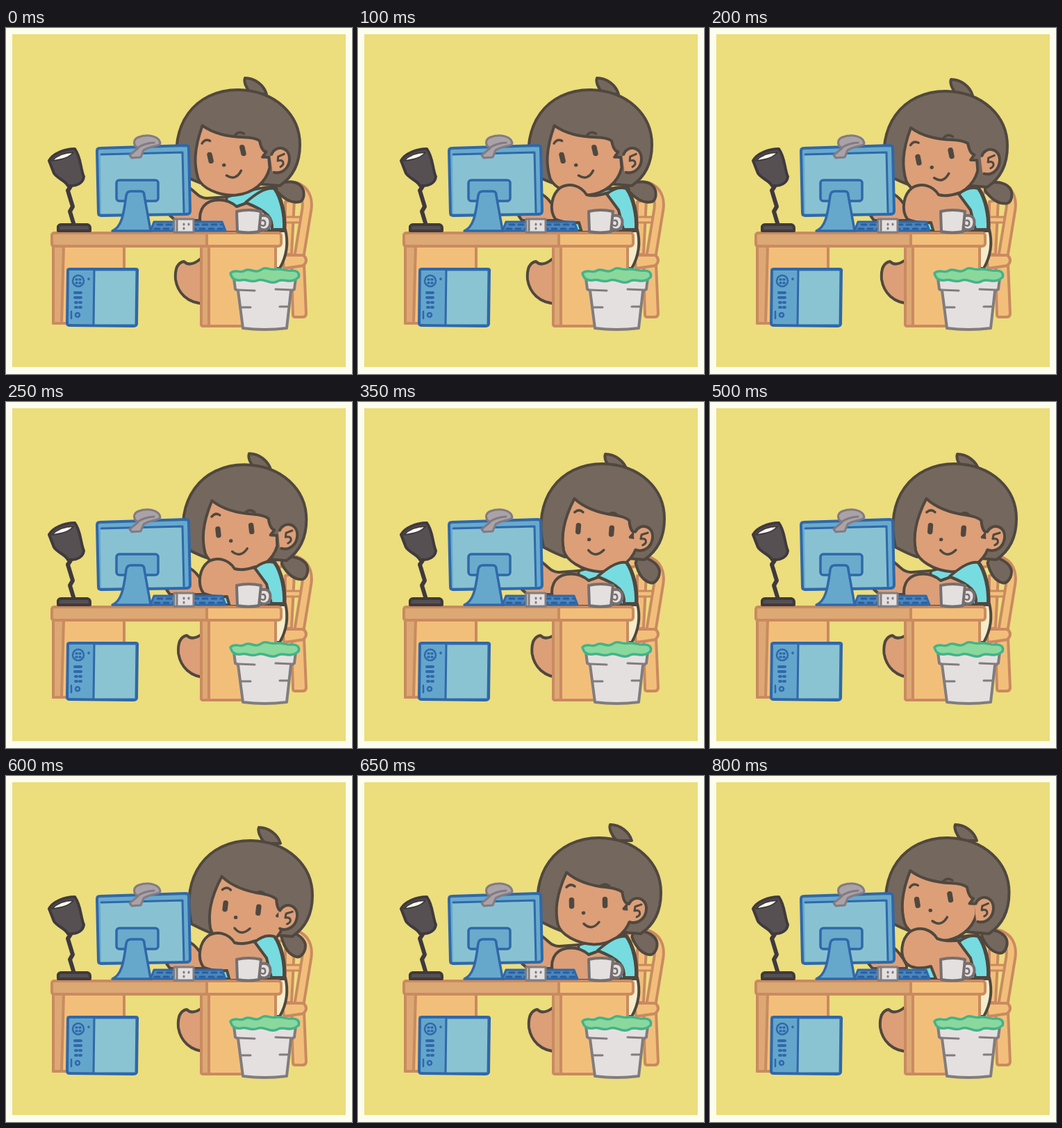
Write an HTML page that moves like this. It is 498x498 px and loops after 0.85 s.

```html
<!DOCTYPE html>
<html lang="en">
<head>
<meta charset="utf-8">
<title>Working at the desk</title>
<style>
html, body { margin: 0; width: 100%; height: 100%; overflow: hidden; background: #fdfdef; }
svg { display: block; width: 498px; height: 498px; stroke-width: 4; stroke-linecap: round; stroke-linejoin: round; }
.line { fill: none; }
.ink { stroke: #50483f; }
.skin { fill: #dc9f78; }
.hair { fill: #74675e; }
.shirt { fill: #76dce0; }
.wood { fill: #f2bf7a; stroke: #ca8a60; }
.shade { fill: #dca873; }
.blue { stroke: #2f68aa; }
.gray { stroke: #827c7e; fill: #e4e0e0; }
</style>
</head>
<body>
<svg viewBox="0 0 498 498">
  <rect x="9" y="9" width="480" height="479" fill="#ecdd7d"/>

  <g class="wood">
    <path class="line" stroke-width="17" d="M394 231C420 221 436 237 433 260L421 334"/>
    <path class="line" stroke-width="9" d="M394 231C420 221 436 237 433 260L421 334" style="stroke:#f2bf7a"/>
    <path d="M402 250L415 247L411 326H402Z"/>
    <path d="M402 272H424L423 280H402Z" stroke-width="3"/>
    <path d="M411 345L429 340L432 412Q431 416 427 416H416Q413 416 413 412Z"/>
    <path d="M398 327H428Q436 334 428 342L400 346Z"/>
  </g>

  <path class="ink" fill="#f5edc9" d="M386 290H402C407 310 403 330 394 346H386Z"/>
  <path class="ink shirt" d="M305 246C335 240 360 228 386 229C398 245 403 270 401 292H305Z"/>

  <path id="tail" class="ink hair" d="M-20 -13C-8 -14 8 -18 17 -8C23 0 21 12 15 14C3 17 -9 9 -18 -1Z"/>
  <path id="tuft" class="ink hair" d="M9 24C1 15 -2 6 0 1C14 1 27 11 31 24Z"/>
  <path id="hair" class="ink hair" d="M267 209C251 140 290 89 352 89C406 90 441 125 441 168C441 195 430 215 412 227L376 224L298 223C286 219 277 214 267 209Z"/>
  <path id="face" class="ink skin" d="M-31 -44C-15 -30 8 -24 27 -22C36 -21 44 -19 49 -15C50 -5 53 1 57 2L51 9L60 10V25C53 46 32 60 8 60C-18 59 -40 45 -44 31C-48 12 -47 -10 -31 -44Z"/>
  <g id="ear">
    <path class="skin" d="M-12 -5C-4 -21 16 -18 15 0C15 14 2 22 -11 18Z"/>
    <path class="ink line" d="M-10 -8C-4 -21 16 -18 15 0C14 14 2 22 -9 18"/>
    <path class="ink line" stroke-width="3" d="M8 -7L-1 -4L-2 2C7 0 8 8 1 11"/>
  </g>
  <g id="features" class="ink line">
    <path stroke-width="7.5" d="M-24 -4.5V4.5M24 -4.5V4.5"/>
    <path stroke-width="3.5" d="M-31 -23Q-25 -29 -19 -24M18 -24Q25 -29 31 -23"/>
    <path stroke-width="3.5" d="M-7 30Q4 41 15 28"/>
    <path stroke-width="5" d="M-7.5 14.5H-7"/>
  </g>

  <path id="backArm" class="ink skin"/>
  <path id="frontArm" class="ink skin"/>
  <path id="sleeve" class="ink shirt"/>
  <path id="leg" class="ink skin" d="M288 322C278 338 264 344 256 336C246 338 243 349 244 362C247 380 260 397 288 397Z"/>

  <g class="wood">
    <path d="M68 314H170V425H68Z"/>
    <path class="shade" d="M68 314H83L80 425H68Z"/>
    <path d="M281 314H388V429H284Q280 429 281 424Z"/>
    <path class="shade" d="M281 314H292V429H284Q280 429 281 424Z"/>
    <rect x="66" y="295" width="330" height="19" rx="4"/>
    <path class="shade" d="M289 295V314H70Q66 314 66 310V299Q66 295 70 295Z"/>
  </g>

  <g class="blue">
    <path fill="#64a6cb" d="M89 349Q89 347 92 347H187Q190 347 189 351L188 426Q187 429 183 429L91 428Q88 428 88 424Z"/>
    <path fill="#8ac4d2" stroke-width="3" d="M127 348H188L187 428H126Z"/>
    <g stroke-width="2.5" class="line">
      <circle cx="104" cy="364" r="8"/>
      <path d="M101 362H102M106 362H107M101 367H102M106 367H107M119 361V361.5" stroke-width="3.5"/>
      <path d="M99 381H108M99 388H108M100 395H102M106 395H108M100 402H102M106 402H108" stroke-width="4"/>
      <circle cx="103" cy="413" r="3"/>
      <path d="M94 408V418"/>
    </g>
  </g>

  <g class="blue">
    <path fill="#4b87bd" stroke-width="3" d="M213 279H311L316 292H208Z"/>
    <path class="line" stroke-width="3" stroke-dasharray="7 6" d="M218 283H310M214 289H312" style="stroke:#2a5f9f"/>
  </g>
  <g class="gray" stroke-width="3">
    <rect x="242" y="275" width="28" height="19"/>
    <path class="line" d="M246 275V293"/>
    <path class="line" d="M256 282V283M256 288V289M263 282V283"/>
  </g>
  <g class="gray" style="stroke:#766f70">
    <path d="M365 271C377 267 382 274 380 283C378 292 368 292 365 288"/>
    <path class="line" d="M369 277Q374 276 373 283Q371 286 368 284" stroke-width="2.5"/>
    <path d="M332 264Q349 260 367 264L364 293Q349 296 333 293Z"/>
  </g>

  <g class="blue">
    <path fill="#68aacd" d="M135 173L259 169Q263 169 263 173L265 263Q265 268 260 268L137 270Q133 270 133 266L131 177Q131 173 135 173Z"/>
    <path fill="#88c2d2" stroke="none" d="M136 182L254 179L256 266L137 267Z"/>
    <path class="line" stroke-width="3" d="M137 182L254 179L256 265"/>
    <rect x="159" y="219" width="60" height="30" rx="4" fill="#6aabcc" stroke-width="3.5"/>
    <path fill="#66a8cb" stroke="none" d="M175 236H198Q203 270 209 293H153Q171 288 173 240Z"/>
    <path class="line" stroke-width="3.5" d="M209 292H153C168 286 170 262 173 241Q174 235 180 235H194Q199 235 199 241L208 291"/>
  </g>
  <path fill="#aaa2a7" stroke="#817b83" stroke-width="3" d="M178 183L190 173C182 168 183 160 191 157C205 152 221 156 222 166C221 171 207 169 198 176L194 186L181 187Z"/>
  <path class="line" stroke="#817b83" stroke-width="3" d="M190 172Q199 166 213 165"/>

  <g stroke="#3f3a3d" fill="#565053">
    <path class="line" stroke-width="6" d="M93 228L89 234L96 257L92 264L98 284"/>
    <path d="M62 191C67 181 84 174 99 174C108 186 107 202 112 214C111 222 104 228 89 227C85 219 74 217 69 209Z"/>
    <path fill="#fbf8ee" stroke-width="2" d="M66 191Q78 179 97 179Q90 189 66 191Z"/>
    <path d="M75 292V286Q76 283 80 283H117Q121 284 121 288V292Z"/>
  </g>

  <g class="gray">
    <path d="M328 360H417L415 376L410 379L404 432Q372 436 341 432L334 378L330 376Z"/>
    <path class="line" stroke-width="3" d="M334 377L358 378M388 376L411 377M338 402H352M394 401H407"/>
  </g>
  <path fill="#8ad89c" stroke="#43b38a" stroke-width="3.5" d="M323 353C331 346 337 354 344 349C352 345 358 354 367 348C374 342 381 350 389 347C398 346 407 351 412 349Q424 350 421 359C409 369 401 360 392 364C381 371 373 360 363 363C352 368 347 360 338 363C328 364 325 360 323 353Z"/>
</svg>
<script>
const STEP = 50, STEPS = 17, STROKES = 5;
const $ = id => document.getElementById(id);

// The head rests on either side, dips, then swings across.
// first and last step, hair x y, face x y angle, ear x y, tuft x y, tail x y angle, leg x
const poses = [
  [0, 2, -18, 0, 317.5, 181.5, -13, 393, 189, 344, 71, 408, 236, 0, 0],
  [4, 4, -13, 2, 323.5, 185, -11.5, 402, 191, 347, 73, 414, 237, 5, 3],
  [7, 10, 0, 0, 341, 184, 4.4, 409, 195, 356, 74, 415, 241, 28, 6.5],
  [12, 12, 0, 4, 339.5, 190, 6.7, 404, 202, 364, 73, 412, 241, 28, 4],
  [13, 13, -5, 0, 331.5, 182.5, -1, 400, 192, 363, 69, 411, 239, 20, 2],
  [16, 16, -10.5, 0, 322, 178, -9.5, 393, 191, 353, 69, 408, 237, 18, 1]
];
poses.push([STEPS, STEPS, ...poses[0].slice(2)]);

const raisedSleeve = "M358 239C366 232 376 228 386 231C396 245 401 270 400 290H382L375 262Z";
const arms = {
  low: {
    backArm: "M262 229C273 235 278 246 290 245L318 243L312 277H244L236 270L250 262Z",
    frontArm: "M282 290C274 266 283 251 300 248C314 246 324 250 332 257L346 252L378 266V294H290Z",
    sleeve: "M345 251C358 240 372 229 386 231C396 245 401 270 400 290H383C384 274 378 264 345 251Z"
  },
  up: {
    backArm: "M262 238C274 243 281 256 286 266V277H236L231 270L250 260Z",
    frontArm: "M284 275C275 262 278 240 291 230C305 222 321 227 329 240C340 243 350 240 360 237L376 263V294H322L318 280Q296 281 284 275Z",
    sleeve: raisedSleeve
  },
  high: {
    backArm: "M262 245C270 251 277 260 283 272V277H234L228 270L248 262Z",
    frontArm: "M283 270C272 258 275 235 288 224C302 215 319 221 327 234C338 238 350 238 362 236L376 262V294H326L318 274C304 278 290 277 283 270Z",
    sleeve: raisedSleeve
  }
};

function poseAt(step) {
  const next = poses.findIndex(p => p[0] > step);
  const a = poses[next - 1], b = poses[next];
  const k = Math.max(0, (step - a[1]) / (b[0] - a[1]));
  return a.map((v, n) => v + (b[n] - v) * k).slice(2);
}

function armsAt(step) {
  const phase = step * STROKES / STEPS % 1;
  if (phase < 0.1 || phase > 0.8) return arms.low;
  return phase < 0.68 ? arms.up : arms.high;
}

function place(id, x, y, angle = 0) {
  $(id).setAttribute("transform", `translate(${x} ${y}) rotate(${angle})`);
}

function draw(now) {
  const step = Math.floor(now / STEP) % STEPS;
  const [hairX, hairY, faceX, faceY, tilt, earX, earY, tuftX, tuftY, tailX, tailY, tailTilt, legX] = poseAt(step);
  place("hair", hairX, hairY);
  place("face", faceX, faceY, tilt * 0.4);
  place("features", faceX, faceY, tilt);
  place("ear", earX, earY, tilt * 0.4);
  place("tuft", tuftX, tuftY);
  place("tail", tailX, tailY, tailTilt);
  place("leg", legX, 0);
  const arm = armsAt(step);
  for (const id in arm) $(id).setAttribute("d", arm[id]);
}

const start = performance.now();
(function tick() {
  draw(performance.now() - start);
  requestAnimationFrame(tick);
})();
</script>
</body>
</html>
```
